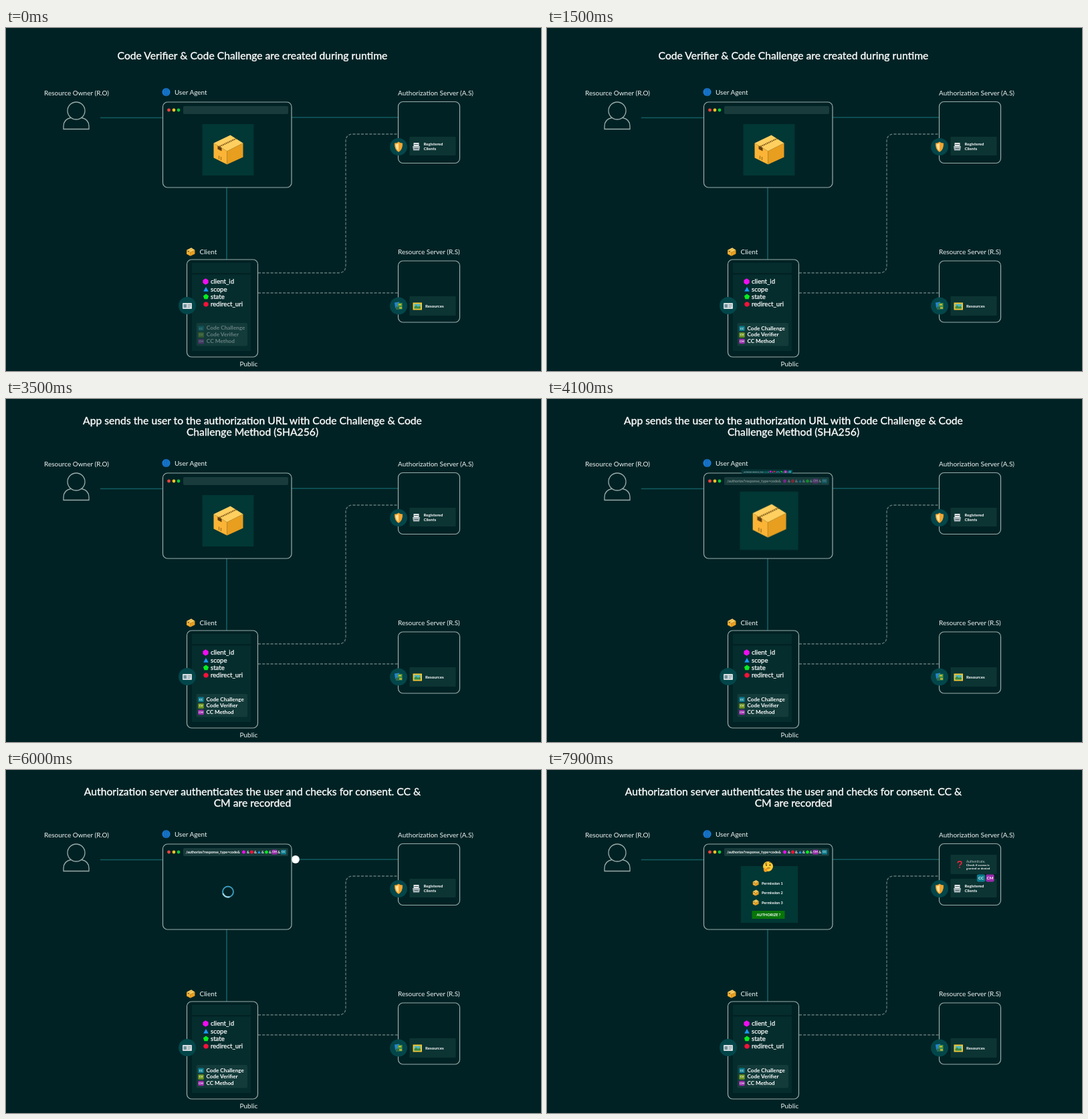
An HTML page for the animation above (8 s loop, 800 px wide and 514 px high).

```html
<!DOCTYPE html>
<html lang="en">
<head>
<meta charset="utf-8">
<title>Authorization flow with code challenge</title>
<style>
html, body { margin: 0; width: 100%; height: 100%; overflow: hidden; background: #012224; }
svg { display: block; width: 100vw; height: 100vh; }
text { font-family: Lato, "Open Sans", sans-serif; fill: #fff; }
.title text { font-size: 15.7px; text-anchor: middle; stroke: #fff; stroke-width: .35px; }
.label { font-size: 10px; fill: #f1f5f5; }
.item { font-size: 9.6px; stroke: #fff; stroke-width: .25px; }
.row { font-size: 8.1px; font-weight: 700; }
.small { font-size: 6.1px; font-weight: 700; }
.tiny { font-size: 4.5px; font-weight: 700; }
.url { font-size: 5.4px; font-weight: 700; }
.big { font-size: 10.3px; stroke: #fff; stroke-width: .2px; }
.mid { text-anchor: middle; }
.frame { fill: #012224; stroke: #9aadac; stroke-width: 1.2; }
.wire { fill: none; stroke: #115c61; stroke-width: 1.7; }
.dash { fill: none; stroke: #627a79; stroke-width: 1.3; stroke-dasharray: 4 2.2; }
.pane { fill: #0c3433; }
.card { fill: #013735; }
.disc { fill: #03464a; }

.a { animation: 8s linear infinite; }
.t1 { animation-name: t1; }
.t2 { animation-name: t2; }
.t3 { animation-name: t3; }
.lit { animation-name: lit; transform-origin: 286px 459px; }
.rise { animation-name: rise; }
.cross { animation-name: cross; }
.parcel { animation-name: parcel; transform-origin: 332px 182.5px; }
.bar { animation-name: bar; }
.pop { animation-name: pop; transform-origin: 329px 119.5px; }
.beam { animation-name: beam; transform-origin: 343px 124px; }
.load { animation-name: load; }
.spin { animation: spin 1s -.7s linear infinite; transform-origin: 332px 182.5px; }
.check { animation-name: check; }
.mark { animation-name: mark; transform-origin: 617px 142px; }
.kept { animation-name: kept; transform-origin: 656px 162px; }
.consent { animation-name: consent; transform-origin: 332px 186px; }

@keyframes t1 { 0%, 23.75% { opacity: 1 } 25%, 100% { opacity: 0 } }
@keyframes t2 { 0%, 25% { opacity: 0 } 27%, 69% { opacity: 1 } 70%, 100% { opacity: 0 } }
@keyframes t3 { 0%, 70% { opacity: 0 } 72%, 100% { opacity: 1 } }
@keyframes lit {
  0%, 6% { opacity: .36; transform: scale(1.025) }
  11%, 100% { opacity: 1; transform: none }
}
@keyframes rise {
  0%, 30% { transform: none; animation-timing-function: ease-in-out }
  41.25%, 100% { transform: translateY(-128px) }
}
@keyframes cross {
  0%, 73.75% { transform: none; animation-timing-function: ease-in-out }
  80%, 100% { transform: translateX(178px) }
}
@keyframes parcel {
  0%, 48.75% { transform: none }
  51.25% { transform: scale(1.14) }
  54%, 100% { transform: scale(0) }
}
@keyframes bar {
  0%, 49% { opacity: 0 }
  51.25% { opacity: .45 }
  54%, 68% { opacity: 0 }
  71%, 100% { opacity: 1 }
}
@keyframes pop {
  0%, 50% { transform: scale(0) }
  51.25% { transform: scale(.25) }
  55% { transform: scale(1.04) }
  56%, 68.75% { transform: none }
  72.5%, 100% { transform: scale(0) }
}
@keyframes beam {
  0%, 54% { opacity: 0; transform: scale(.6) }
  57%, 67.5% { opacity: 1; transform: none }
  69.5%, 100% { opacity: 0; transform: scale(.6) }
}
@keyframes load { 0%, 54% { opacity: 0 } 56%, 88.5% { opacity: 1 } 89.5%, 100% { opacity: 0 } }
@keyframes spin { to { transform: rotate(360deg) } }
@keyframes check { 0%, 80% { opacity: 0 } 82.5%, 100% { opacity: 1 } }
@keyframes mark {
  0%, 82% { transform: scale(0) }
  86.25% { transform: scale(1.6) }
  90%, 100% { transform: none }
}
@keyframes kept { 0%, 82.5% { transform: scale(0) } 85%, 100% { transform: none } }
@keyframes consent {
  0%, 89% { transform: scale(0) }
  91.5% { transform: scale(1.08) }
  93%, 100% { transform: none }
}
</style>
</head>
<body>
<svg viewBox="0 0 800 514">
<defs>
  <g id="box">
    <path d="M-21-10 4-22 23-10-1 2Z" fill="#ffcf60"/>
    <path d="M-21-10-1 2V22L-21 12Z" fill="#fbb436"/>
    <path d="M-1 2 23-10V11L-1 22Z" fill="#e89e1e"/>
    <path d="M-12-5 13-17" stroke="#7a5416" stroke-width="2.2" stroke-dasharray="1.6 1"/>
    <path d="M-15-6-9-3V2L-15-1Z" fill="#5d3d12"/>
    <path d="M-13 9v5M-10 10.500v5" stroke="#a06d18" stroke-width="1.200"/>
  </g>
  <path id="hex" d="M0-5 4.300-2.500V2.500L0 5-4.300 2.500V-2.500Z" fill="#f20df2" stroke="#f20df2" stroke-linejoin="round"/>
  <path id="tri" d="M0-4.500 4.700 4H-4.700Z" fill="#1c97f5"/>
  <path id="pent" d="M0-5 4.800-1.500 2.900 4H-2.900L-4.800-1.500Z" fill="#05ee20"/>
  <path id="oct" d="M-2-4.800H2L4.800-2V2L2 4.800H-2L-4.800 2V-2Z" fill="#f7123a"/>
  <g id="cc"><rect x="-8.5" y="-7.500" width="17" height="15" rx="2.500" fill="#0b7c8e"/><text class="mid" y="3" font-size="8.500" font-weight="700">CC</text></g>
  <g id="cv"><rect x="-8.5" y="-7.500" width="17" height="15" rx="2.500" fill="#6f961f"/><text class="mid" y="3" font-size="8.500" font-weight="700">CV</text></g>
  <g id="cm"><rect x="-8.5" y="-7.500" width="17" height="15" rx="2.500" fill="#9a2cab"/><text class="mid" y="3" font-size="8.500" font-weight="700">CM</text></g>
</defs>

<rect width="800" height="514" fill="#012224"/>

<g class="title">
  <text class="a t1" x="368.5" y="46.500">Code Verifier &amp; Code Challenge are created during runtime</text>
  <g class="a t2">
    <text x="368.5" y="38">App sends the user to the authorization URL with Code Challenge &amp; Code</text>
    <text x="368.5" y="54.700">Challenge Method (SHA256)</text>
  </g>
  <g class="a t3">
    <text x="368.5" y="38">Authorization server authenticates the user and checks for consent. CC &amp;</text>
    <text x="368.5" y="54.700">CM are recorded</text>
  </g>
</g>

<!-- connections -->
<path class="wire" d="M141 134.500H234M427 134H586M330 239V347"/>
<path class="dash" d="M377 367H497Q508 367 508 356V170Q508 159 519 159H586M377 397H586"/>
<circle class="a rise" cx="330" cy="354" r="6" fill="#fff"/>
<circle class="a cross" cx="418" cy="134" r="6" fill="#fff"/>

<!-- resource owner -->
<text class="label" x="57" y="101">Resource Owner (R.O)</text>
<g fill="none" stroke="#9aadac" stroke-width="1.3">
  <circle cx="105" cy="124" r="13"/>
  <path d="M97 134.500C90 136 86 140 86 147V151.500H124V147C124 140 120 136 113 134.500"/>
</g>

<!-- user agent -->
<circle cx="239.500" cy="96" r="6" fill="#1c86e0"/>
<g fill="none" stroke="#0b4b94" stroke-width=".6">
  <ellipse cx="239.500" cy="96" rx="2.800" ry="6"/>
  <path d="M239.500 90V102M233.500 96H245.500M234.500 93H244.500M234.500 99H244.500"/>
</g>
<text class="label" x="252" y="99.500">User Agent</text>
<rect class="frame" x="234.500" y="111" width="192.500" height="128" rx="7"/>
<circle cx="243.500" cy="123" r="2.400" fill="#f0443e"/>
<circle cx="251" cy="123" r="2.400" fill="#f7c325"/>
<circle cx="258" cy="123" r="2.400" fill="#12c83c"/>
<rect x="265" y="117" width="157" height="12" rx="2" fill="#193b3b"/>
<g class="a bar">
  <text class="url" x="269" y="125">/authorize?response_type=code&amp;</text>
  <g class="url mid">
    <text x="362" y="125">&amp;</text><text x="373" y="125">&amp;</text><text x="384" y="125">&amp;</text>
    <text x="395" y="125">&amp;</text><text x="408.200" y="125">&amp;</text>
  </g>
  <use href="#hex" transform="translate(355.500 123) scale(.5)"/>
  <use href="#oct" transform="translate(367.500 123) scale(.52)"/>
  <use href="#tri" transform="translate(378.500 123) scale(.5)"/>
  <use href="#pent" transform="translate(389.500 123) scale(.55)"/>
  <use href="#cm" transform="translate(401.500 123) scale(.48)"/>
  <use href="#cc" transform="translate(415 123) scale(.48)"/>
</g>
<g class="a parcel">
  <rect class="card" x="293.500" y="144" width="77" height="77"/>
  <use href="#box" transform="translate(331.500 182.500)"/>
</g>
<g class="a load" fill="none" stroke-width="1.900">
  <circle cx="332" cy="182.500" r="8" stroke="#3b9dc0"/>
  <path class="spin" d="M324 182.500A8 8 0 0 1 332 174.500" stroke="#b5e4f0"/>
</g>
<g class="a consent">
  <rect class="card" x="290" y="144" width="85" height="85"/>
  <circle cx="330.500" cy="144.500" r="7.500" fill="#ffca36"/>
  <circle cx="328" cy="142.500" r="1.100" fill="#4a3210"/>
  <circle cx="333.500" cy="142.500" r="1.100" fill="#4a3210"/>
  <path d="M326 140.500l3-1M332 138.500q2-1 3.500 1M328.500 147.500q3-1.500 5-.5" fill="none" stroke="#6a4513" stroke-width=".9"/>
  <path d="M324 146q1.500-.5 2 2l6-1q1.500.5 0 1.500l-3 1q1 3-2 3.500-4 0-3-7Z" fill="#f39a1f"/>
  <use href="#box" transform="translate(312 169.500) scale(.2)"/>
  <use href="#box" transform="translate(312 184) scale(.2)"/>
  <use href="#box" transform="translate(312 198.500) scale(.2)"/>
  <g font-size="5.600" font-weight="700">
    <text x="321" y="172">Permission 1</text>
    <text x="321" y="186.300">Permission 2</text>
    <text x="321" y="200.600">Permission 3</text>
    <rect x="306.500" y="211" width="49" height="12" fill="#077508"/>
    <text class="mid" x="331.500" y="219">AUTHORIZE ?</text>
  </g>
</g>

<!-- enlarged address -->
<path class="a beam" d="M178 87 264 125.500H421L479 87Z" fill="#033336"/>
<g class="a pop">
  <rect x="177.500" y="66" width="302" height="23" rx="3" fill="#033639" stroke="#24686b" stroke-width="1.200"/>
  <text class="big" x="183" y="81">.../authorize?response_type=<tspan font-weight="700" style="fill:#13e0cf;stroke:none">code</tspan>&amp;</text>
  <g class="big mid">
    <text x="362" y="81">&amp;</text><text x="384" y="81">&amp;</text><text x="402" y="81">&amp;</text>
    <text x="424" y="81">&amp;</text><text x="453" y="81">&amp;</text>
  </g>
  <use href="#hex" transform="translate(349.500 77.500) scale(1.080)"/>
  <use href="#oct" transform="translate(372 77.500)"/>
  <use href="#tri" transform="translate(393 77.500) scale(1.050)"/>
  <use href="#pent" transform="translate(414 78)"/>
  <use href="#cm" transform="translate(438.500 77.500)"/>
  <use href="#cc" transform="translate(465.500 77.500)"/>
</g>

<!-- client -->
<use href="#box" transform="translate(276 335.500) scale(.28)"/>
<text class="label" x="289.500" y="339">Client</text>
<rect class="frame" x="270.500" y="347" width="106" height="146" rx="7"/>
<rect x="278" y="352" width="88" height="15" fill="#062d2d"/>
<rect x="278" y="369.500" width="88" height="114.500" fill="#062d2d"/>
<use href="#hex" transform="translate(298.500 380) scale(.85)"/>
<use href="#tri" transform="translate(299 391.500) scale(.8)"/>
<use href="#pent" transform="translate(299 402.800) scale(.85)"/>
<use href="#oct" transform="translate(299 414) scale(.75)"/>
<text class="item" x="306" y="383">client_id</text>
<text class="item" x="306" y="394.500">scope</text>
<text class="item" x="306" y="406">state</text>
<text class="item" x="306" y="417">redirect_uri</text>
<rect x="284.500" y="442" width="76.500" height="34.500" rx="2" fill="#133b3a"/>
<g class="a lit">
  <use href="#cc" transform="translate(291.500 450.200) scale(.5)"/>
  <use href="#cv" transform="translate(291.500 459.900) scale(.5)"/>
  <use href="#cm" transform="translate(291.500 469.500) scale(.5)"/>
  <text class="row" x="299.500" y="452.500">Code Challenge</text>
  <text class="row" x="299.500" y="462">Code Verifier</text>
  <text class="row" x="299.500" y="471.500">CC Method</text>
</g>
<circle class="disc" cx="271" cy="416" r="13"/>
<rect x="264" y="412" width="14" height="9" rx="1" fill="#d5dde0"/>
<path d="M265.500 414H270V419H265.500Z" fill="#6e8f9c"/>
<path d="M271.500 414.500H276.500M271.500 416.500H276.500M271.500 418.500H275" stroke="#83959b" stroke-width=".8"/>
<text class="label" x="349.500" y="507">Public</text>

<!-- authorization server -->
<text class="label" x="586" y="101">Authorization Server (A.S)</text>
<rect class="frame" x="586.500" y="110.500" width="92" height="92" rx="7"/>
<g class="a check">
  <rect class="pane" x="603.500" y="127" width="69" height="29" rx="1"/>
  <text x="627" y="138.500" font-size="4.800" style="fill:#b9c8c7">Authenticate,</text>
  <text class="tiny" x="627" y="143.700">Check if access is</text>
  <text class="tiny" x="627" y="148.700">granted or denied</text>
</g>
<g class="a mark">
  <path d="M614.200 139.500q0-2.600 2.800-2.600 2.900 0 2.900 2.400 0 1.500-1.600 2.300-1.300.7-1.300 2.200" fill="none" stroke="#e3243b" stroke-width="1.700"/>
  <circle cx="617" cy="146" r="1.100" fill="#e3243b"/>
</g>
<rect class="pane" x="603.500" y="163" width="69" height="28" rx="1"/>
<path d="M609.500 172H617.500V177H609.500Z" fill="#e4e8e8"/>
<path d="M608 177H619L618 183.500H609Z" fill="#aab6ba"/>
<path d="M610.500 174.500H616.500M610.500 180.500H616.500" stroke="#4d5e63"/>
<text class="small" x="624.500" y="176">Registered</text>
<text class="small" x="624.500" y="183">Clients</text>
<g class="a kept">
  <use href="#cc" transform="translate(649 162) scale(.72)"/>
  <use href="#cm" transform="translate(662.500 162) scale(.72)"/>
</g>
<circle class="disc" cx="587" cy="178" r="13"/>
<path d="M587 170.500Q590 173 593 172.500 593.500 182 587 186 580.500 182 581 172.500 584 173 587 170.500Z" fill="#f0a530"/>
<path d="M587 172.500Q584.500 174.300 582.500 174.200 582.500 181 587 184Z" fill="#ffe09a"/>

<!-- resource server -->
<text class="label" x="586" y="339">Resource Server (R.S)</text>
<rect class="frame" x="586.500" y="349" width="92" height="92" rx="7"/>
<rect class="pane" x="603.500" y="402" width="69" height="29" rx="1"/>
<rect x="608.500" y="411.500" width="13.500" height="11" fill="#f4c531"/>
<rect x="610.500" y="413.500" width="9.500" height="7" fill="#4cb6c4"/>
<path d="M610.500 420.500V418L613.500 415.500 616 418 618 416.500 620 418.500V420.500Z" fill="#3c8a3f"/>
<text class="small" x="627" y="419">Resources</text>
<circle class="disc" cx="587" cy="416.500" r="13"/>
<rect x="581.500" y="411" width="7" height="8" fill="#2384cf" transform="rotate(-8 585 415)"/>
<rect x="585.500" y="412" width="7" height="9.500" fill="#4a9440"/>
<path d="M583 417.500H588V422H583Z" fill="#2d6d50"/>
<path d="M587 414.500H591M588 419.500H592" stroke="#f0c437" stroke-width="1.300"/>
</svg>
</body>
</html>
```
